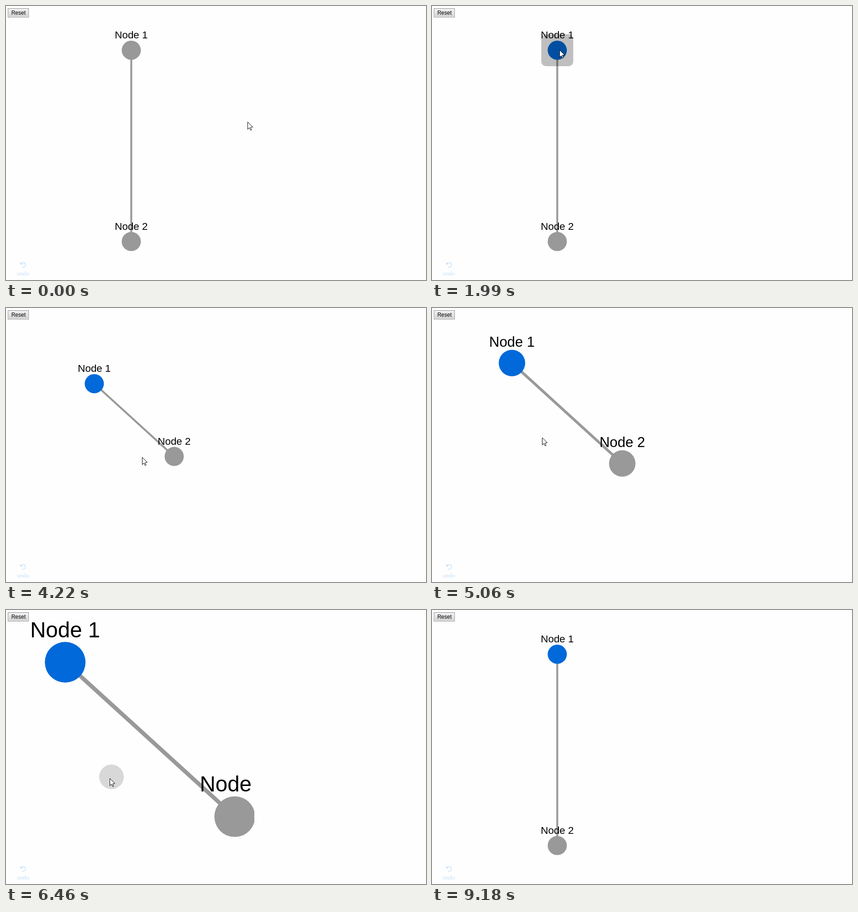
These frames come from a looping animation (920 by 601 pixels, 9.89 s). An HTML page with a canvas:

```html
<!DOCTYPE html>
<html lang="en">
<head>
<meta charset="utf-8">
<title>Node graph</title>
<style>
  html, body { margin: 0; width: 100%; height: 100%; overflow: hidden; background: #fefefe; }
  canvas { display: block; }
</style>
</head>
<body>
<canvas id="stage" width="920" height="601"></canvas>
<script>
const ctx = document.getElementById('stage').getContext('2d');
const LOOP = 9890, FIRST_TICK = 456, TICK = 138.4;
const SANS = '"Liberation Sans", Arial, sans-serif';
const GREY = '#999', BLUE = '#0169d9', PALE = '#c4e0f9';

// The screen refreshes once per tick; every action below is timed in ticks.
const press1 = [11, 16], press2 = [21, 26], pressPan = [38, 46], pressReset = [55, 56];
const zoomSpan = [30, 37], ZOOM = 2.122, LAG = 0.2;
const home = [529, 254];
const moves = [
  { from: -1, to: 4, x: 279, y: 96 },      // to node 1
  { from: 11, to: 15, x: 198, y: 165 },    // drag it
  { from: 16, to: 19, x: 267, y: 531 },    // to node 2
  { from: 21, to: 25, x: 361, y: 340 },    // drag it
  { from: 26, to: 27, x: 298, y: 327 },
  { from: 27, to: 28, x: 241, y: 284 },    // zoom here
  { from: 39, to: 42.8, x: 231, y: 366 },  // pan
  { from: 42.8, to: 44.2, x: 200, y: 384 },
  { from: 47, to: 53, x: 27, y: 14 },      // to the button
  { from: 60, to: 62, x: 782, y: 246 }     // leave
];

const clamp = (v, lo, hi) => Math.min(hi, Math.max(lo, v));
const within = (v, [from, to]) => v >= from && v < to;
const progress = (tick, from, to) => clamp((tick - from) / (to - from), 0, 1);

function pointerAt(tick) {
  let [px, py] = home;
  for (const { from, to, x, y } of moves) {
    const k = progress(tick, from, to);
    px += (x - px) * k;
    py += (y - py) * k;
  }
  return [px, py];
}

function dragged(tick, [from, to]) {
  const [x0, y0] = pointerAt(from), [x, y] = pointerAt(clamp(tick, from, to));
  return [x - x0, y - y0];
}

function disc(x, y, r, fill) {
  ctx.fillStyle = fill;
  ctx.beginPath();
  ctx.arc(x, y, r, 0, 7);
  ctx.fill();
}

function label(text, x, y, font, fill = '#000', align = 'center') {
  ctx.font = font;
  ctx.fillStyle = fill;
  ctx.textAlign = align;
  ctx.fillText(text, x, y);
}

function drawNode(name, [x, y], scale, fill, pressed) {
  const r = 21 * scale, size = 22.4 * scale;
  disc(x, y, r, fill);
  label(name, x, y - r - size * 0.22, `${size}px ${SANS}`);
  if (pressed) {
    ctx.fillStyle = 'rgba(0,0,0,.25)';
    ctx.beginPath();
    ctx.roundRect(x - 35, y - 35, 70, 70, 10);
    ctx.fill();
  }
}

function drawGraph(tick) {
  const reset = tick >= pressReset[1];
  const scale = reset ? 1 : ZOOM ** progress(tick, ...zoomSpan);
  const pan = dragged(tick - LAG, pressPan);
  const place = (x, y, [dx, dy]) => reset ? [x, y] : [
    241.3 + (x + dx - 241.3) * scale + pan[0],
    284.9 + (y + dy - 284.9) * scale + pan[1]
  ];
  const a = place(274.4, 97, dragged(tick, press1));
  const b = place(274.4, 516.6, dragged(tick, press2));

  ctx.save();
  ctx.beginPath();
  ctx.rect(4, 25, 540, 576);
  ctx.clip();
  if (within(tick, pressPan)) disc(241 + pan[0], 284 + pan[1], 27, 'rgba(0,0,0,.15)');
  ctx.strokeStyle = GREY;
  ctx.lineWidth = 4.2 * scale;
  ctx.beginPath();
  ctx.moveTo(...a);
  ctx.lineTo(...b);
  ctx.stroke();
  // The first click, at tick 6, selects node 1.
  drawNode('Node 1', a, scale, tick > 6 ? BLUE : GREY, tick === 6 || within(tick, press1));
  drawNode('Node 2', b, scale, GREY, within(tick, press2));
  ctx.restore();
}

function drawButton(hover, pressed) {
  const [border, top, bottom] = pressed ? ['#2c628b', '#e5f4fc', '#8fc9e8']
    : hover ? ['#3c7fb1', '#eaf6fd', '#a7d9f5'] : ['#8a8a8a', '#f2f2f2', '#cfcfcf'];
  const shade = ctx.createLinearGradient(0, 6, 0, 24);
  shade.addColorStop(0, top);
  shade.addColorStop(1, bottom);
  ctx.fillStyle = shade;
  ctx.fillRect(4, 5, 46, 20);
  ctx.lineWidth = 1;
  ctx.strokeStyle = '#f8f8f8';
  ctx.strokeRect(5.5, 6.5, 43, 17);
  ctx.strokeStyle = border;
  ctx.strokeRect(4.5, 5.5, 45, 19);
  label('Reset', 27.3, 19, `12px ${SANS}`);
}

function drawUndo() {
  ctx.strokeStyle = PALE;
  ctx.lineWidth = 1.5;
  ctx.beginPath();
  ctx.arc(37.5, 568, 5.2, -2.7, 2);
  ctx.moveTo(31.8, 562);
  ctx.lineTo(31.8, 566.2);
  ctx.lineTo(36, 566.2);
  ctx.stroke();
  label('undo', 24, 591, '13.33px "Liberation Serif", "Times New Roman", serif', PALE, 'left');
}

const arrow = new Path2D('M.5 .5V16.5L4.2 13L6.7 18.5L9 17.5L6.6 12.2L11.5 11.5Z');

function drawPointer(x, y) {
  ctx.save();
  ctx.translate(Math.round(x), Math.round(y));
  ctx.fillStyle = '#fff';
  ctx.strokeStyle = '#000';
  ctx.lineWidth = 1;
  ctx.fill(arrow);
  ctx.stroke(arrow);
  ctx.restore();
}

function draw(time) {
  const tick = Math.floor((time % LOOP - FIRST_TICK) / TICK);
  const [x, y] = pointerAt(tick);
  ctx.fillStyle = '#fefefe';
  ctx.fillRect(0, 0, 920, 601);
  drawGraph(tick);
  drawUndo();
  drawButton(within(x, [4, 50]) && within(y, [5, 25]), within(tick, pressReset));
  if (tick < 63) drawPointer(x, y);
}

const start = performance.now();
(function animate() {
  draw(performance.now() - start);
  requestAnimationFrame(animate);
})();
</script>
</body>
</html>
```
